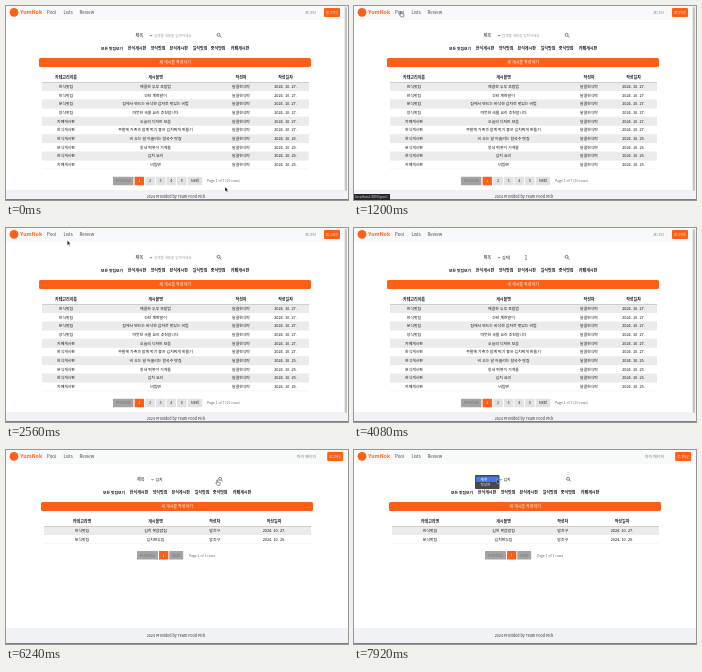
These frames come from a looping animation (342 px wide and 194 px high, 8 s). An HTML page:

```html
<!DOCTYPE html>
<html lang="ko">
<head>
<meta charset="utf-8">
<title>Recipe board</title>
<style>
html, body { margin: 0; width: 100%; height: 100%; overflow: hidden; background: #fff; }
svg { display: block; width: 100vw; height: 100vh; }
text { font-family: "Noto Sans CJK KR", "Noto Sans CJK", "Noto Sans", sans-serif; white-space: pre; }
</style>
</head>
<body>
<svg id="stage" viewBox="0 0 342 194" preserveAspectRatio="none"></svg>
<script>
const LOOP = 8000;
const ORANGE = '#fd5f17';
const INK = '#161616';

const rect = (x, y, w, h, fill, r = 0) =>
  `<rect x="${x}" y="${y}" width="${w}" height="${h}" rx="${r}" fill="${fill}"/>`;

// y is the vertical middle of the line
const text = (x, y, str, size = 4, fill = INK, weight = 500, anchor = 'middle') =>
  `<text x="${x}" y="${y + size * 0.36}" font-size="${size}" fill="${fill}" font-weight="${weight}" text-anchor="${anchor}">${str}</text>`;

const left = (x, y, str, size, fill, weight) => text(x, y, str, size, fill, weight, 'start');

function navbar(shift, user) {
  return rect(0, 0, 342, 13.4, '#f8f9fa') + rect(0, 13.2, 342, 0.4, '#eceef0') +
    `<circle cx="8" cy="6.3" r="4.4" fill="${ORANGE}"/>` +
    left(14.3, 6.3, 'YumNok', 5.3, ORANGE, 700) +
    left(41, 6.6, 'Pool', 4.4, '#444', 400) +
    left(57.5, 6.6, 'Lists', 4.4, '#444', 400) +
    left(73.5, 6.6, 'Review', 4.4, '#444', 400) +
    text(304.5 + (shift ? 0 : -4), 6.5, user, 3.9, '#777', 400) +
    rect(318 + (shift ? 0 : 3.2), 2, 16, 9, ORANGE, 1) +
    text(326 + (shift ? 0 : 3.2), 6.4, '로그아웃', 3.3, '#fff', 500);
}

function tabs(dx) {
  const names = ['모든 맛집보기', '한식게시판', '양식맛집', '분식게시판', '일식맛집', '중식맛집', '카페게시판'];
  const mids = [106, 131, 152, 172.7, 194, 212.2, 234];
  return names.map((s, i) => text(mids[i] + dx, 43, s, i ? 4 : 3.8, INK, 700)).join('');
}

const newPost = (x, y) =>
  rect(x, y, 272, 9, ORANGE, 1.6) + text(x + 136, y + 4.5, '새 게시물 작성하기', 4, '#fff', 500);

function table(x, y, mids, heads, rows) {
  const step = 8.68;
  let out = heads.map((s, i) => text(mids[i], y, s, 4, INK, 700)).join('');
  out += rect(x, y + 4, 267, 0.5, '#444');
  rows.forEach((row, r) => {
    const mid = y + 8.5 + r * step;
    if (r % 2 === 0) out += rect(x, mid - 4.1, 267, step - 0.3, '#ebebeb');
    out += rect(x, mid + 4.2, 267, 0.3, '#dcdfe2');
    out += row.map((s, i) => text(mids[i], mid, s, 3.9)).join('');
  });
  return out;
}

// each button: [x, width, label, state]
function pager(y, buttons, noteX, note) {
  const look = { off: ['#a3a3a3', '#777'], on: [ORANGE, '#fff'], idle: ['#e2e2e2', '#222'] };
  return buttons.map(([x, w, s, state]) =>
    rect(x, y, w, 8.6, look[state][0], 0.5) + text(x + w / 2, y + 4.3, s, 3.7, look[state][1])
  ).join('') + left(noteX, y + 4.4, note, 3.4, '#666', 400);
}

const footer = (y, mid) =>
  rect(0, y, 342, 194 - y, '#f0f2f6') +
  text(170, mid, '2024 Provided by Team Food Pick', 3.7, '#333', 400);

function listPage() {
  const topics = ['한식맛집', '한식맛집', '분식맛집', '양식맛집', '카페게시판', '한식게시판', '한식게시판', '분식게시판', '한식게시판', '카페게시판'];
  const titles = ['매콤한 두부 조림법', '간단 계란말이', '집에서 만드는 바삭한 감자전 맛있는 비법',
    '따뜻한 국물 요리 추천합니다', '오늘의 디저트 모음', '주말에 가족과 함께 먹기 좋은 김치찌개 만들기',
    '비 오는 날 어울리는 칼국수 맛집', '동네 떡볶이 가게들', '김치 요리', '비빔면'];
  const rows = topics.map((s, i) => [s, titles[i], '달콤한식탁', `2024. 10. ${i < 6 ? 27 : 25}.`]);
  const nums = [2, 3, 4, 5].map((n, i) => [139.2 + i * 10.6, 9.6, n, 'idle']);
  return navbar(true, '로그인') + tabs(0) + newPost(33, 52) +
    table(36, 72, [60, 149.5, 235, 279.5], ['카테고리이름', '게시물명', '작성자', '작성일자'], rows) +
    pager(170.7, [[107, 20.4, 'Previous', 'off'], [128.6, 9.4, '1', 'on'], ...nums, [181.7, 14.5, 'Next', 'idle']],
      201, 'Page 1 of 7 (10 rows)') +
    footer(184, 191) +
    rect(338, 0, 4, 194, '#f4f4f4') + rect(338.8, 1, 2.2, 184, '#c4c4c4', 1.1);
}

const shortPager = y => pager(y,
  [[131, 21, 'Previous', 'off'], [153, 9.3, '1', 'on'], [163.3, 13.9, 'Next', 'off']], 183, 'Page 1 of 1 rows');

const emptyPage = () => navbar(false, '마이 페이지') + newPost(35, 45) +
  table(38, 65, [82, 164, 222.5, 274.5], ['카테고리명', '게시물명', '작성자', '작성일자'], []) +
  shortPager(77) + footer(178, 185.5);

const foundPage = () => navbar(false, '마이 페이지') + tabs(2) + newPost(35, 52) +
  table(38, 72, [76, 149.5, 208.7, 268], ['카테고리명', '게시물명', '작성자', '작성일자'], [
    ['한식맛집', '김치 볶음밥집', '밥친구', '2024. 10. 27.'],
    ['분식맛집', '김치만두집', '밥친구', '2024. 10. 25.']
  ]) + shortPager(101) + footer(178, 185.5);

const search = '<g id="search">' + left(129.5, 29.7, '제목', 4.1, INK) +
  '<path d="M144 29l1.1 1.2 1.1-1.2" fill="none" stroke="#333" stroke-width=".6"/>' +
  '<g id="query"></g>' + rect(0, 27.4, 0.4, 4.4, '#222').replace('<rect', '<rect id="caret"') +
  '<g fill="none" stroke="#333" stroke-width=".6"><circle cx="212.6" cy="28.8" r="1.5"/><path d="M213.7 29.9l1.7 1.7"/></g></g>';

const menu = '<g id="menu">' + rect(121, 25, 24.5, 14, '#47484a', 1) +
  rect(121.8, 26.4, 22.9, 5.7, '#3f78ee', 0.8) +
  left(126.5, 29.2, '제목', 3.8, '#fff') + left(126.5, 35.2, '작성자', 3.5, '#fff') + '</g>';

const status = '<g id="status">' + rect(0, 188, 36, 6, '#26282c') +
  left(1, 190.9, 'localhost:3000/pool', 3.5, '#ddd', 400) + '</g>';

const pointers = '<g id="pointer">' +
  '<path id="arrow" d="M0 0v4.6l1.1-1 .8 1.7.8-.4-.8-1.6h1.5z" fill="#111" stroke="#fff" stroke-width=".35"/>' +
  '<path id="hand" d="M0 0q.7-.4.9.4v1.6l2 .5q.6.3.5 1l-.4 1.9h-2.4l-1.8-2.2q.1-.7.9-.3l.3.2z" fill="#fff" stroke="#111" stroke-width=".45"/>' +
  '<path id="beam" d="M-.8-2h1.6M0-2v4M-.8 2h1.6" fill="none" stroke="#222" stroke-width=".4"/></g>';

document.getElementById('stage').innerHTML = rect(0, 0, 342, 194, '#fff') +
  `<g id="list">${listPage()}</g><g id="empty">${emptyPage()}</g><g id="found">${foundPage()}</g>` +
  search + rect(0, 193.3, 342, 0.7, '#4a4d52') + status + menu + pointers;

const $ = id => document.getElementById(id);
const show = (id, on) => $(id).setAttribute('display', on ? 'inline' : 'none');
const clamp = v => Math.max(0, Math.min(1, v));

// pointer stops: time, x, y
const PATH = [[0, 219, 181], [80, 219, 181], [880, 24, 6.5], [960, 24, 6.5], [1080, 46.5, 5.5], [1640, 46.5, 5.5],
  [2320, 22, 6.5], [2400, 22, 6.5], [2880, 172, 29.5], [4880, 172, 29.5], [5600, 213, 28.5],
  [6160, 213, 28.5], [6960, 138, 78.5], [7120, 138, 78.5], [7600, 143, 29], [LOOP, 143, 29]];

const TYPING = [[3440, 'ㄱ'], [3520, '기'], [3600, '김'], [3840, '김ㅊ'], [4000, '김치']];

function pointerAt(t) {
  const i = PATH.findIndex(p => p[0] > t);
  const [t0, x0, y0] = PATH[i - 1], [t1, x1, y1] = PATH[i];
  const u = (t - t0) / (t1 - t0), k = u * u * (3 - 2 * u);
  return [x0 + (x1 - x0) * k, y0 + (y1 - y0) * k];
}

let lastQuery = null;

function render(t) {
  const found = t >= 5820, empty = t >= 1280 && t < 1760;
  show('list', !found && !empty);
  show('empty', empty);
  show('found', found);
  $('search').setAttribute('transform', `translate(${found || empty ? 1.5 : 0} 0)`);

  const query = TYPING.reduce((s, [at, str]) => t >= at ? str : s, '');
  if (query !== lastQuery) {
    $('query').innerHTML = query ? left(148, 29.7, query, 3.9, INK)
      : left(148, 29.7, '검색할 내용을 입력하세요', 3.5, '#999', 400);
    lastQuery = query;
  }
  $('caret').setAttribute('x', 148 + query.length * 3.6);
  show('caret', t >= 3120 && t < 5700 && (t < 4480 || (t - 4480) % 1000 >= 500));

  show('status', t >= 980 && t < 1680);
  $('status').setAttribute('opacity', 1 - clamp((t - 1520) / 160));
  show('menu', t >= 7840);

  const [x, y] = pointerAt(t);
  const beam = x > 148 && x < 207 && y > 25 && y < 34;
  const hand = (y < 12 && x < 90) || (x > 208 && x < 217 && y > 25 && y < 33);
  $('pointer').setAttribute('transform', `translate(${x} ${y})`);
  show('beam', beam);
  show('hand', hand);
  show('arrow', !beam && !hand);
}

const start = performance.now();
function tick() {
  render((performance.now() - start) % LOOP);
  requestAnimationFrame(tick);
}
tick();
</script>
</body>
</html>
```
